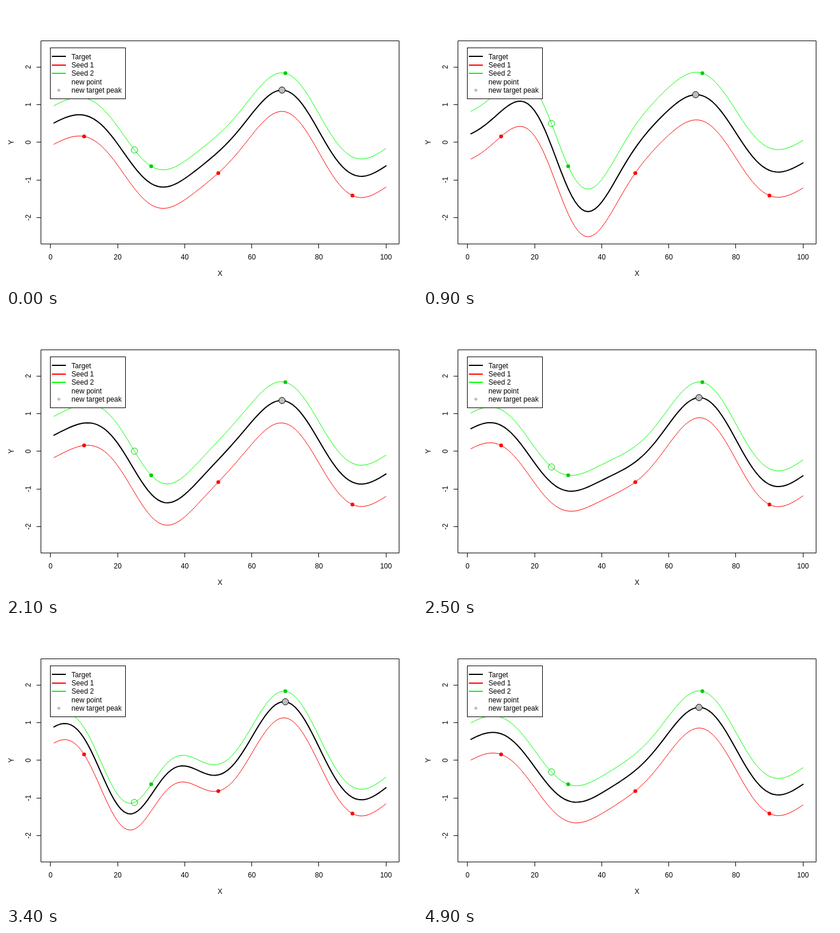
Animation, 700 px wide and 480 px high, one loop 5000 ms. Source, as an HTML page:

```html
<!DOCTYPE html>
<html lang="en">
<head>
<meta charset="utf-8">
<title>Gaussian process with two seeds</title>
<style>
  html, body { margin: 0; width: 100%; height: 100%; overflow: hidden; background: #fff; }
  svg { display: block; width: 700px; height: 480px; }
  text { font: 12px "Liberation Sans", Arial, sans-serif; fill: #000; }
  .mid { text-anchor: middle; }
  .axes, .curve { fill: none; stroke: #000; stroke-linejoin: round; stroke-linecap: round; }
  .axes { stroke-linecap: butt; }
</style>
</head>
<body>
<svg viewBox="0 0 700 480">
  <path id="axes" class="axes"/>
  <g id="labels" class="mid">
    <text x="364.4" y="461.3">X</text>
    <text transform="translate(13 232.8) rotate(-90)">Y</text>
  </g>
  <path id="target" class="curve" stroke-width="2"/>
  <path id="seed1" class="curve" style="stroke: #f00"/>
  <path id="seed2" class="curve" style="stroke: #0f0"/>
  <g id="dots"></g>
  <circle id="fresh" r="5.4" fill="none" stroke="#00cd00"/>
  <circle id="peak" r="5.4" fill="#bebebe" stroke="#000"/>
  <g id="legend">
    <rect x="75.5" y="71.5" width="128" height="87" fill="#fff" stroke="#000"/>
    <path d="M78 86h24" stroke="#000" stroke-width="2"/>
    <path d="M78 101h24" stroke="#f00" stroke-width="2"/>
    <path d="M78 115h24" stroke="#0f0" stroke-width="2"/>
    <path d="M90 141.2l2.7 2.7l-2.7 2.7l-2.7 -2.7z" fill="#bebebe" stroke="#bebebe"/>
  </g>
</svg>
<script>
const STEP = 100, STEPS = 50;
const el = id => document.getElementById(id);
const px = x => 59.04 + (x + 2.96) / 106.92 * 610.72;
const py = y => 232.8 - y * 64.356;
const snap = v => Math.floor(v) + 0.5;

function add(parent, tag, attrs, text = '') {
  const node = document.createElementNS('http://www.w3.org/2000/svg', tag);
  for (const key in attrs) node.setAttribute(key, attrs[key]);
  node.textContent = text;
  el(parent).append(node);
}

function place(id, x, y) {
  el(id).setAttribute('cx', px(x));
  el(id).setAttribute('cy', py(y));
}

// Gaussian process: shared smooth curve plus one constant offset per seed
const points = [
  { x: 10, y: 0.155, seed: 1 }, { x: 50, y: -0.817, seed: 1 }, { x: 90, y: -1.414, seed: 1 },
  { x: 30, y: -0.637, seed: 2 }, { x: 70, y: 1.834, seed: 2 }
];
const smooth = (a, b) => Math.exp(-((a - b) ** 2) / 200);
const cov = (p, q) => smooth(p.x, q.x) + (p.seed === q.seed ? 1 : 0);
const dot = (a, b) => a.reduce((sum, v, i) => sum + v * b[i], 0);

// Gauss-Jordan elimination; the covariance is positive definite
function solve(pts, rhs) {
  const m = pts.map((p, i) => [...pts.map(q => cov(p, q)), rhs[i]]);
  m.forEach((pivot, i) => {
    const d = pivot[i];
    pivot.forEach((v, k) => { pivot[k] = v / d; });
    m.forEach((row, j) => {
      if (j === i) return;
      const f = row[i];
      row.forEach((v, k) => { row[k] = v - f * pivot[k]; });
    });
  });
  return m.map(row => row[pts.length]);
}

// The new point swings two standard deviations around its prediction
const fresh = { x: 25, seed: 2 };
const link = points.map(p => cov(p, fresh));
const gain = solve(points, link);
const mean = dot(gain, points.map(p => p.y));
const sd = Math.sqrt(2 - dot(gain, link));
const grid = Array.from({ length: 100 }, (_, i) => i + 1);

function draw(step) {
  const y = mean + 2 * sd * Math.sin(2 * Math.PI * (step + 1) / STEPS);
  const all = [...points, { ...fresh, y }];
  const w = solve(all, all.map(p => p.y));
  const curve = grid.map(x => dot(w, all.map(p => smooth(x, p.x))));
  const offset = seed => dot(w, all.map(p => p.seed === seed ? 1 : 0));
  const trace = (id, shift) => el(id).setAttribute('d',
    'M' + curve.map((v, i) => px(grid[i]).toFixed(2) + ' ' + py(v + shift).toFixed(2)).join('L'));
  trace('target', 0);
  trace('seed1', offset(1));
  trace('seed2', offset(2));
  place('fresh', fresh.x, y);
  const top = Math.max(...curve);
  place('peak', grid[curve.indexOf(top)], top);
}

let axes = 'M59.5 59.5H669.5V406.5H59.5Z';
for (let x = 0; x <= 100; x += 20) {
  axes += `M${snap(px(x))} 407V414`;
  add('labels', 'text', { x: px(x), y: 432.5 }, x);
}
for (let y = -2; y <= 2; y++) {
  axes += `M59 ${snap(py(y))}H52`;
  add('labels', 'text', { transform: `translate(41.8 ${py(y)}) rotate(-90)` }, y);
}
el('axes').setAttribute('d', axes);

for (const p of points) {
  add('dots', 'circle', { cx: px(p.x), cy: py(p.y), r: 3.2, fill: p.seed === 1 ? '#f00' : '#00cd00' });
}
['Target', 'Seed 1', 'Seed 2', 'new point', 'new target peak'].forEach((name, i) =>
  add('legend', 'text', { x: 111.6, y: 90.6 + 14.4 * i }, name));

let shown = -1;
function tick(now) {
  const step = Math.floor(now / STEP) % STEPS;
  if (step !== shown) draw(shown = step);
  requestAnimationFrame(tick);
}
draw(0);
requestAnimationFrame(tick);
</script>
</body>
</html>
```
